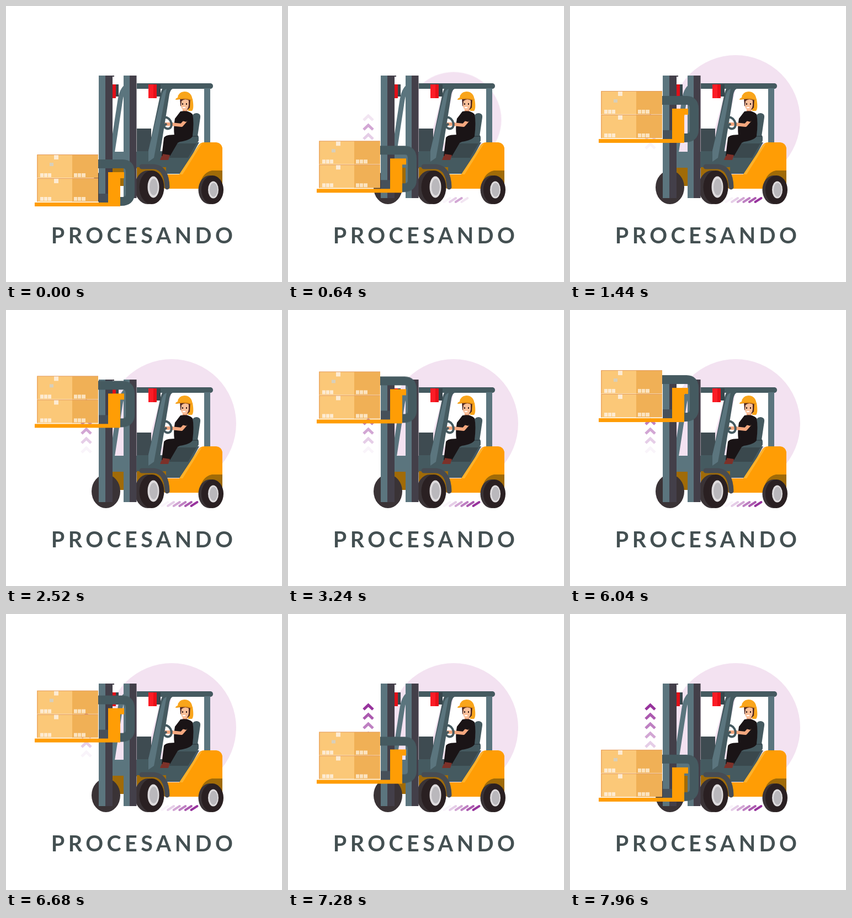
An HTML page for the animation above (8000 ms loop, 500 px wide and 500 px high).

```html
<!DOCTYPE html>
<html lang="es">
<head>
<meta charset="utf-8">
<title>Procesando</title>
<style>
  @property --t { syntax: "<number>"; inherits: true; initial-value: 0; }
  html, body { margin: 0; height: 100%; overflow: hidden; background: #fff; }
  svg { display: block; width: 100vw; height: 100vh; animation: clock 8s linear infinite; }
  .slate { fill: #455a60; }
  .light { fill: #5b757e; }
  .dark { fill: #433f49; }
  .side { fill: #3a3336; }
  .tyre { fill: #2a2022; }
  .orange { fill: #ff9d05; }
  .shade { fill: #a06b08; }
  .rim { fill: #dedbdd; }
  .hub { fill: #bab8bc; }
  .skin { fill: #f3a77e; }
  .black { fill: #1a1416; }
  .bar { fill: none; stroke: #455a60; }
  .mark { fill: none; stroke: #97339d; }
  #disc { fill: #f3e2f1; transform-origin: 300px 206px; animation: grow 8s infinite; }
  #load { animation: lift 8s infinite; }
  /* Marks light up one after another, 200 ms apart */
  .mark > * { opacity: calc(clamp(0, var(--t) / 200 - var(--i), 1) * (var(--i) + .3) / 5.3); }
  text { font: 700 39.5px Lato, sans-serif; letter-spacing: 6.45px; fill: #445052; }

  @keyframes clock { from { --t: 0; } to { --t: 8000; } }
  @keyframes grow {
    0% { transform: scale(0); animation-timing-function: ease-in-out; }
    12.4%, 100% { transform: none; }
  }
  @keyframes lift {
    0% { transform: none; animation-timing-function: cubic-bezier(.34, 0, 0, 1); }
    50.5% { transform: translateY(-160px); }
    75% { transform: translateY(-160px); animation-timing-function: cubic-bezier(.528, 0, .246, .682); }
    100% { transform: translateY(-22px); }
  }
</style>
</head>
<body>
<svg viewBox="0 0 500 500">
  <defs>
    <g id="box">
      <path fill="#fbc878" d="M56 0H121V42.500H56Z"/>
      <path fill="#f0b056" d="M120 0H167V42.500H120Z"/>
      <path fill="none" stroke="#e39a5c" d="M57 42.500V.5H167"/>
      <path fill="#fdebd2" d="M87 1h8v8h-8zM62 34h6v7h-6zM69 34h6v7h-6zM76 34h6v7h-6z"/>
      <path fill="#fbe3bf" d="M123 34h6v7h-6zM130 34h6v7h-6zM137 34h7v7h-7z"/>
    </g>
  </defs>

  <circle id="disc" cx="300" cy="206" r="117"/>
  <path fill="#fff" d="M237 150H282L262 225H237ZM300 150H360V248H278Z"/>
  <g id="chevrons" class="mark" stroke-width="5"></g>
  <g id="dashes" class="mark" stroke-width="4" stroke-linecap="round"></g>

  <!-- far side -->
  <path class="light" d="M192 264H240V294H192Z"/>
  <path class="shade" d="M192 293H213V326H192Z"/>
  <ellipse class="side" cx="181" cy="328.500" rx="26" ry="30.500"/>
  <path fill="none" stroke="#5b757e" stroke-width="9" d="M236 145H222Q211 147 207 170L192 268"/>
  <path fill="#e01019" d="M191 142h8v25h-8z"/>
  <path fill="#37474d" d="M199 142h5v22h-5z"/>

  <!-- cabin -->
  <path fill="#3e4b51" d="M237 222H263V266H237Z"/>
  <path class="slate" d="M237 263H300V295H237Z"/>
  <path class="slate" d="M298 247H350L319 304H286V281H298Z"/>
  <path fill="#3a484d" d="M301 249H345L330 275H296Z"/>
  <path class="slate" d="M338 198Q340 194 346 194Q353 195 352 202L347 236H332Z"/>
  <rect class="slate" x="304" y="233" width="45" height="15" rx="5"/>
  <path stroke="#37474d" stroke-width="2" d="M332 236H348"/>

  <!-- driver -->
  <path class="black" d="M307 233H338V236Q334 243 315 246L311 248L297 272H282L286 239Q288 233 307 233Z"/>
  <path fill="#7c3129" d="M284 268L297 270L294 279H279Q280 274 284 270Z"/>
  <path fill="#f9a51b" d="M330 168H338Q341 186 337 190H330Z"/>
  <path class="skin" d="M320 184h9v10h-9z"/>
  <path class="black" d="M316 191Q330 188 338 196Q341 211 338 235H305Q303 220 306 204Z"/>
  <path fill="none" stroke="#f3a77e" stroke-width="6" stroke-linecap="round" stroke-linejoin="round" d="M325 208L318 216L299 214M296 214L285 214"/>
  <path class="black" d="M319 193Q331 191 332 199L327 210L315 207Z"/>
  <path fill="#4a2420" d="M315 166H334L333 184L329 188L316 181Z"/>
  <path fill="#fac09a" d="M318 172Q324 167 331 171V180Q330 189 323 189Q317 187 317 180Z"/>
  <path fill="#36201d" d="M319 176h2v3h-2zM326 176h2v3h-2z"/>
  <path stroke="#fff" stroke-width="2" d="M320 184H325"/>
  <path fill="#f9a51b" d="M311 166Q312 156 323 155Q337 155 338 172Q326 166 307 170Q307 167 311 166Z"/>
  <path fill="#db8514" d="M307 170Q323 164 336 170V171Q323 167 307 170Z"/>
  <ellipse class="bar" stroke-width="4" cx="291" cy="212" rx="8" ry="11" transform="rotate(-30 291 212)"/>
  <path class="bar" stroke-width="4" d="M291 213L278 224"/>

  <!-- frame and body -->
  <path class="slate" d="M237 140H371Q375 141 375 145T371 150H237Z"/>
  <path class="light" d="M359 149H370V250H359Z"/>
  <path class="slate" d="M293 141H310V150H302Q298 151 296 160L277 279L258 290V262L279 163Q282 145 293 141Z"/>
  <path class="light" d="M282 163Q284 152 291 150L268 275L258 282V262Z"/>
  <path fill="#fb1c26" d="M258 142h9v25h-9z"/>
  <path fill="#e80f18" d="M267 142h6v25h-6z"/>
  <path fill="#37474d" d="M273 142h7v22h-7z"/>
  <path class="shade" d="M237 292H290V330H237Z"/>
  <path class="orange" d="M290 305H314L347 255Q351 247 359 247H381Q390 248 392 257V331H287Z"/>
  <path fill="#ffb22c" d="M314 305L347 255Q350 250 355 249L320 305Z"/>
  <path class="shade" d="M392 298V322H360V331H351Q352 303 373 298Z"/>
  <path fill="none" stroke="#474c53" stroke-width="9" stroke-linecap="round" d="M246 291H268Q291 293 292 328"/>

  <!-- wheels -->
  <ellipse class="side" cx="369" cy="333" rx="20.500" ry="26"/>
  <ellipse class="tyre" cx="374" cy="333" rx="20" ry="26"/>
  <ellipse class="rim" cx="375.500" cy="333" rx="9.500" ry="15.500"/>
  <ellipse class="hub" cx="376" cy="333" rx="7" ry="12.500"/>
  <ellipse class="side" cx="257" cy="328.500" rx="24" ry="30.500"/>
  <ellipse class="tyre" cx="264" cy="328.500" rx="22.500" ry="30.500"/>
  <ellipse class="rim" cx="267" cy="328" rx="10.500" ry="19.500"/>
  <ellipse class="hub" cx="267.500" cy="328" rx="7.500" ry="15"/>

  <!-- mast -->
  <path class="light" d="M168 126h13v222h-13zM213 126h12v222h-12z"/>
  <path class="dark" d="M180 126h16v2h-3v220h-13zM224 126h12.500v222h-12.500z"/>

  <g id="load">
    <path fill="#46505a" d="M168 340h18v16h-18z"/>
    <path class="bar" stroke-width="16" d="M167 286H211Q225 286 225 301V340Q225 354 209 354H190"/>
    <path class="orange" d="M185 301H214V312H207V363H52V356H185Z"/>
    <use href="#box" y="269"/>
    <use href="#box" y="312"/>
    <path fill="#d8cfba" d="M79 284h7v6h-7z"/>
  </g>

  <text x="81.800" y="430.200">PROCESANDO</text>
</svg>
<script>
  const addMarks = (id, path) => {
    const row = document.getElementById(id);
    for (let i = 0; i < 6; i++) {
      const mark = document.createElementNS("http://www.w3.org/2000/svg", "path");
      mark.setAttribute("d", path(i));
      mark.style.setProperty("--i", i);
      row.append(mark);
    }
  };
  addMarks("chevrons", i => `M137 ${258 - 17 * i}l8.500 -8l8.500 8`);
  addMarks("dashes", i => `M${282.5 + 10.6 * i} 355l11 -7`);
</script>
</body>
</html>
```
